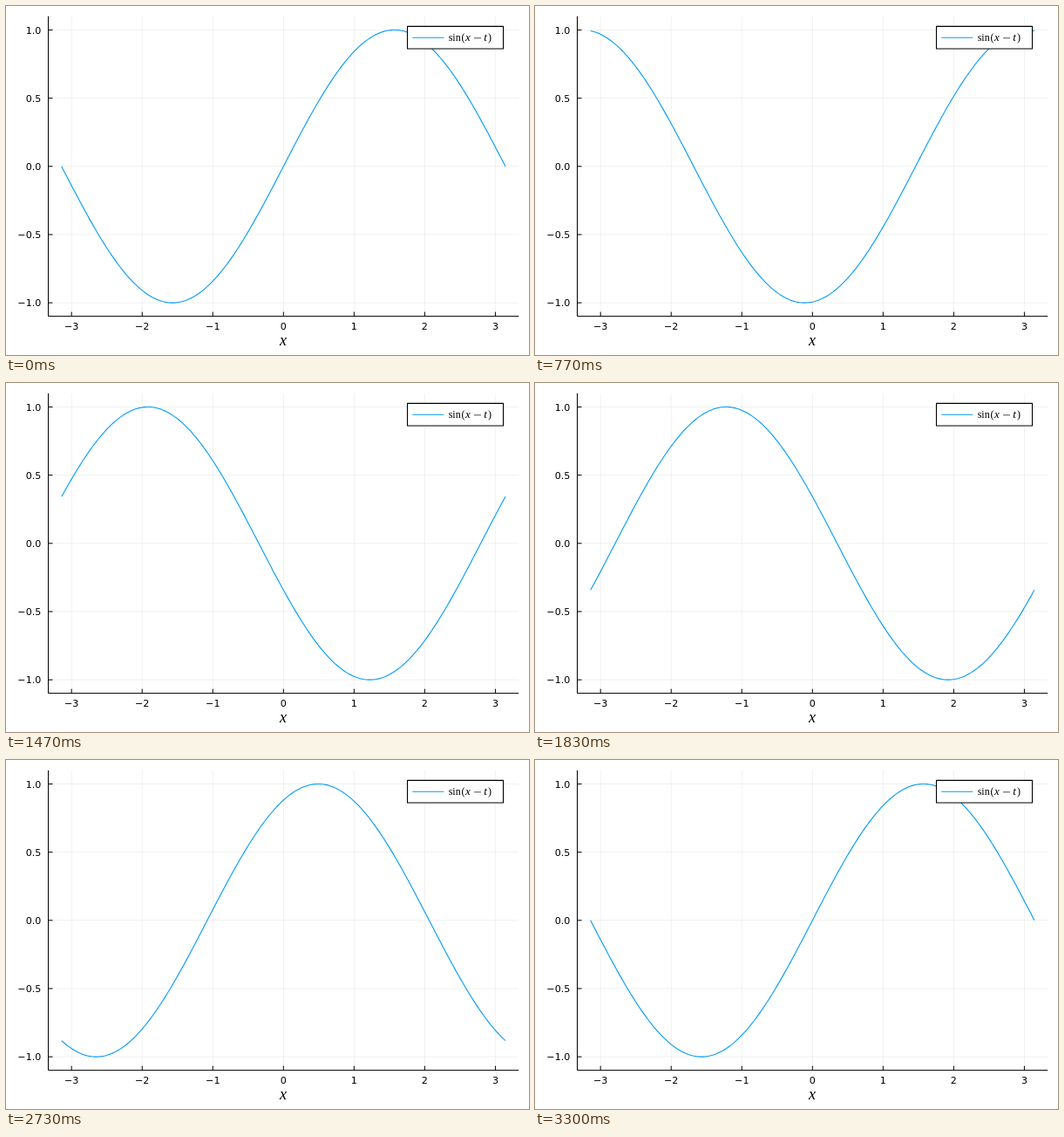
An HTML page with a canvas that plays this animation: 600x400 px, repeating every 3.33 s.

```html
<!DOCTYPE html>
<html lang="en">
<head>
<meta charset="utf-8">
<title>Travelling sine wave</title>
<style>
html, body { margin: 0; width: 100%; height: 100%; overflow: hidden; background: #fff; }
canvas { display: block; width: 600px; height: 400px; }
</style>
</head>
<body>
<canvas id="stage" width="600" height="400"></canvas>
<script>
const ctx = document.getElementById('stage').getContext('2d');
const LOOP = 3330, STEPS = 99;
const BLUE = '#009afa', BLACK = '#000';
const LEFT = 48.5, RIGHT = 588.2, TOP = 11.8, BOTTOM = 355.6;
const SERIF = '"Liberation Serif", serif';
const px = x => 318.3 + 81.04 * x;
const py = y => 183.8 - 156.35 * y;

function line(x1, y1, x2, y2, color, width = 1) {
  ctx.strokeStyle = color;
  ctx.lineWidth = width;
  ctx.beginPath();
  ctx.moveTo(x1, y1);
  ctx.lineTo(x2, y2);
  ctx.stroke();
}

function label(text, x, y, font, align = 'left') {
  ctx.font = font;
  ctx.textAlign = align;
  ctx.fillStyle = BLACK;
  ctx.fillText(text, x, y);
}

function drawAxes() {
  const font = '11.1px "DejaVu Sans", sans-serif';
  const xs = [-3, -2, -1, 0, 1, 2, 3], ys = [-1, -0.5, 0, 0.5, 1];
  const signed = text => text.replace('-', '\u2212');
  const gridColor = 'rgba(0,0,0,0.1)';
  for (const x of xs) line(px(x), BOTTOM, px(x), TOP, gridColor, 0.6);
  for (const y of ys) line(LEFT, py(y), RIGHT, py(y), gridColor, 0.6);

  line(LEFT, BOTTOM, RIGHT, BOTTOM, BLACK);
  line(LEFT, BOTTOM, LEFT, TOP, BLACK);
  for (const x of xs) {
    line(px(x), BOTTOM, px(x), BOTTOM - 5, BLACK);
    label(signed(String(x)), px(x), 371.2, font, 'center');
  }
  for (const y of ys) {
    line(LEFT, py(y), LEFT + 5, py(y), BLACK);
    label(signed(y.toFixed(1)), 40.3, py(y) + 4.1, font, 'right');
  }
  label('x', 318.1, 388.8, `italic 18px ${SERIF}`, 'center');
}

function drawWave(t) {
  const samples = 240;
  ctx.strokeStyle = BLUE;
  ctx.lineWidth = 1.1;
  ctx.lineJoin = 'round';
  ctx.beginPath();
  for (let i = 0; i <= samples; i++) {
    const x = Math.PI * (2 * i / samples - 1);
    ctx.lineTo(px(x), py(Math.sin(x - t)));
  }
  ctx.stroke();
}

function drawLegend() {
  ctx.fillStyle = '#fff';
  ctx.fillRect(460.5, 23.4, 110, 25.6);
  ctx.strokeStyle = BLACK;
  ctx.lineWidth = 1.1;
  ctx.strokeRect(460.5, 23.4, 110, 25.6);
  line(466.3, 36.3, 502.3, 36.3, BLUE, 1.1);

  const upright = `12px ${SERIF}`, italic = `italic 13px ${SERIF}`;
  label('sin', 507.7, 39.8, upright);
  label('(', 522.4, 39.8, upright);
  label('x', 527, 39.8, italic);
  line(537, 36.8, 545, 36.8, BLACK, 0.7);
  label('t', 548.2, 39.8, italic);
  label(')', 553, 39.8, upright);
}

function frame(now) {
  // Steps last a thirtieth of a second, on a 10 ms clock.
  const tick = Math.floor(now % LOOP / 10) * 10;
  const step = Math.floor((tick + 5) * 0.03);
  ctx.fillStyle = '#fff';
  ctx.fillRect(0, 0, 600, 400);
  drawAxes();
  drawWave(2 * Math.PI * step / STEPS);
  drawLegend();
}

let start;
function run(now) {
  start ??= now;
  frame(Math.max(0, now - start));
  requestAnimationFrame(run);
}
frame(0);
requestAnimationFrame(run);
</script>
</body>
</html>
```
